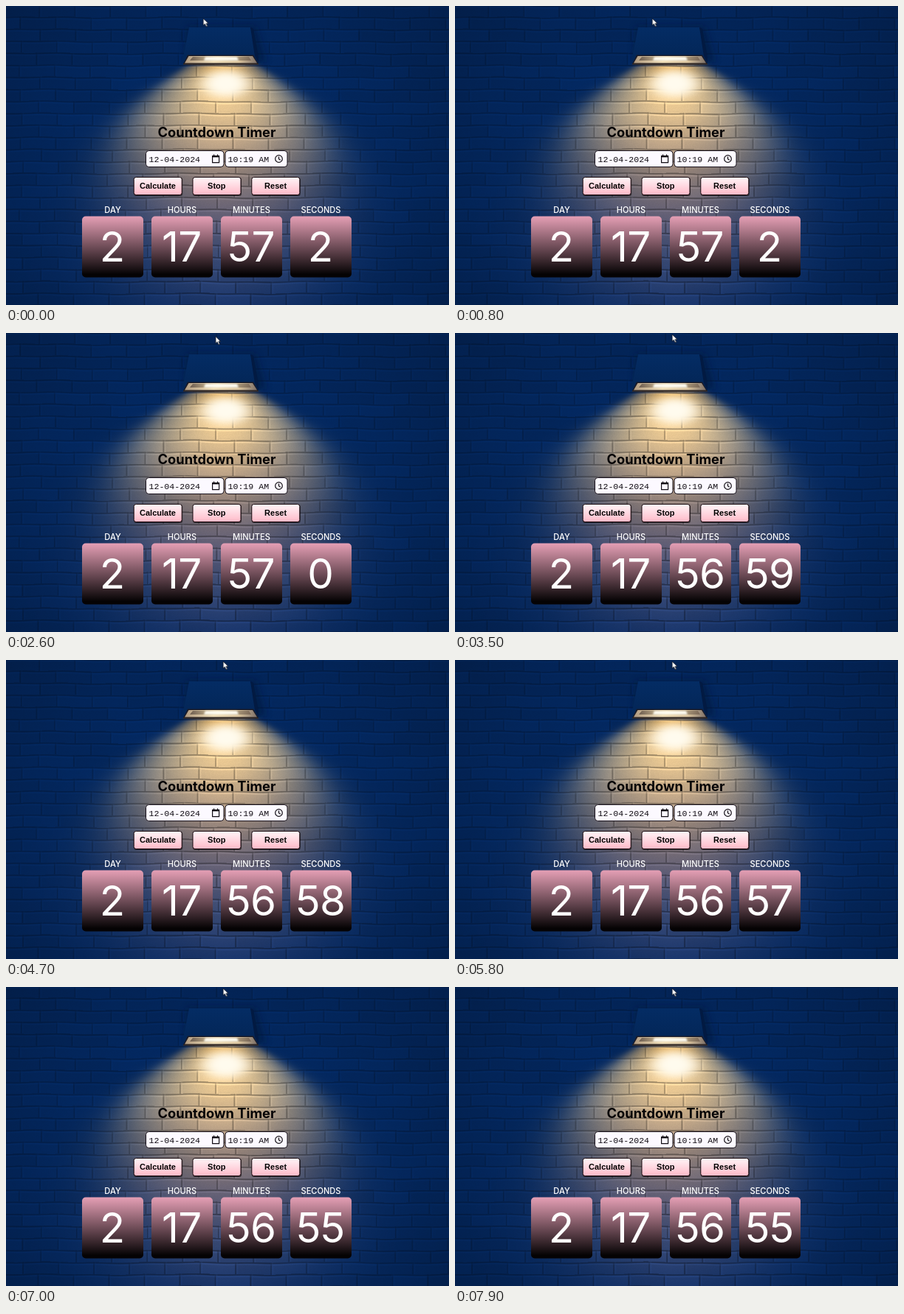
Animation of 600 by 406 pixels, one loop 8000 ms. Source, as an HTML page with a canvas:

```html
<!DOCTYPE html>
<html lang="en">
<head>
<meta charset="utf-8">
<title>Countdown Timer</title>
<style>
  html, body { margin: 0; width: 100%; height: 100%; overflow: hidden; background: #03265e; }
  canvas, svg { position: absolute; left: 0; top: 0; width: 600px; height: 406px; display: block; }
  text { text-anchor: middle; }
  .title { font: 700 18.3px Inter, "Open Sans", sans-serif; fill: #050305; }
  .field { fill: #fcf9ff; stroke: #17101a; }
  .value { font: 11.6px "Liberation Mono", "Courier New", monospace; fill: #120d14; text-anchor: start; }
  .button { fill: url(#pink); stroke: #16090e; }
  .caption { font: bold 11px "Liberation Sans", Arial, sans-serif; fill: #000; }
  .label { font: 500 11.1px Inter, "Open Sans", sans-serif; fill: #fff; }
  .digits { font: 56.5px Inter, "Open Sans", sans-serif; fill: #fff; letter-spacing: -.8px; }
  .cursor { animation: wander 8s linear infinite; }
  @keyframes wander {
    0%, 13% { transform: translate(267.3px, 17px); }
    17.5% { transform: translate(263px, 17.3px); }
    21%, 28.5% { transform: translate(256.3px, 12px); }
    34%, 100% { transform: translate(294.2px, 2px); }
  }
</style>
</head>
<body>
<canvas id="wall" width="600" height="406"></canvas>
<svg viewBox="0 0 600 406">
  <defs>
    <linearGradient id="pink" x2="0" y2="1">
      <stop offset="0" stop-color="#fff6f8"/><stop offset="1" stop-color="#ffb9c8"/>
    </linearGradient>
    <linearGradient id="card" x2="0" y2="1">
      <stop offset="0" stop-color="#e59fb5"/><stop offset=".95" stop-color="#050304"/>
    </linearGradient>
    <linearGradient id="shade" x2="0" y2="1">
      <stop offset="0" stop-color="#042c64"/><stop offset="1" stop-color="#032555"/>
    </linearGradient>
    <linearGradient id="lip">
      <stop offset="0" stop-color="#b09a80"/><stop offset=".4" stop-color="#efdcb4"/>
      <stop offset=".75" stop-color="#d9c29b"/><stop offset="1" stop-color="#7d7068"/>
    </linearGradient>
    <linearGradient id="inside">
      <stop offset="0" stop-color="#6d5d50"/><stop offset=".45" stop-color="#e8d3a6"/>
      <stop offset="1" stop-color="#7a6857"/>
    </linearGradient>
    <filter id="soft" x="-30%" y="-30%" width="160%" height="160%"><feGaussianBlur stdDeviation="5"/></filter>
    <filter id="glow" x="-30%" y="-80%" width="160%" height="260%"><feGaussianBlur stdDeviation="1"/></filter>
  </defs>

  <g id="lamp">
    <path d="M246 28H338L352 76H242Z" fill="#011638" opacity=".55" filter="url(#soft)"/>
    <path d="M248 29H331L341 68V78H240V70Z" fill="url(#shade)"/>
    <path d="M331 29L335 31L342 70V78L337 68Z" fill="#021a42"/>
    <path d="M246 66.500H335L342 79H240Z" fill="#1a1a26"/>
    <path d="M247.500 68H334L340 77.500H242Z" fill="url(#lip)"/>
    <path d="M253 69H329L332 74H249Z" fill="url(#inside)"/>
    <path d="M270 69.300H313L315 74H268Z" fill="#fffdf2" filter="url(#glow)"/>
    <path d="M240 78.800H342" stroke="#3a2a1c" stroke-width="1.200"/>
  </g>

  <text class="title" x="285.500" y="177.800">Countdown Timer</text>

  <rect class="field" x="189.500" y="196.500" width="105.500" height="22" rx="4"/>
  <rect class="field" x="297" y="196.500" width="84" height="22" rx="4"/>
  <text class="value" x="193.500" y="211.700">12-04-2024</text>
  <text class="value" x="300.500" y="211.700">10:19 AM</text>
  <g fill="none" stroke="#120d14" stroke-width="1.200">
    <path d="M279.600 203.500H288.600V212.600H279.600Z"/>
    <path d="M279.600 204.300H288.600" stroke-width="2.200"/>
    <path d="M281.600 201.500V204M286.600 201.500V204"/>
    <circle cx="369.500" cy="207.500" r="4.800"/>
    <path d="M369.500 204.500V207.800L371.700 209.300"/>
  </g>

  <g id="buttons"></g>
  <g id="cards"></g>

  <g class="cursor">
    <path d="M0 0V9.200L2.200 7.300L3.900 11L5.500 10.300L3.900 6.700H6.700Z" fill="#fff" stroke="#10131c" stroke-width=".7"/>
  </g>
</svg>
<script>
const $ = id => document.getElementById(id);

$('buttons').innerHTML = ['Calculate', 'Stop', 'Reset'].map((name, i) => {
  const x = 173.2 + i * 79.8;
  return `<rect x="${x}" y="233" width="66" height="25" rx="3" fill="#0a0508" opacity=".6"/>
    <rect class="button" x="${x}" y="232.500" width="65" height="24" rx="3"/>
    <text class="caption" x="${x + 32.3}" y="248">${name}</text>`;
}).join('');

$('cards').innerHTML = ['DAY', 'HOURS', 'MINUTES', 'SECONDS'].map((name, i) => {
  const x = 103 + i * 94;
  return `<text class="label" x="${x + 41.5}" y="281">${name}</text>
    <rect x="${x}" y="285.500" width="83" height="83" rx="5" fill="url(#card)"/>
    <text class="digits" x="${x + 40.7}" y="346.700"></text>`;
}).join('');

// Brick wall lit from the lamp, shaded per pixel
function paintWall() {
  const W = 600, H = 406, ROW = 16.3, BRICK = 48;
  const ctx = $('wall').getContext('2d');
  const img = ctx.createImageData(W, H);
  const stops = [
    [78, 232, 180, 98], [105, 252, 214, 150], [140, 238, 204, 150],
    [170, 206, 177, 139], [200, 172, 149, 126], [240, 132, 118, 117],
    [290, 95, 93, 118], [340, 58, 74, 115], [406, 26, 53, 106]
  ];
  const hash = (a, b) => {
    const v = Math.sin(a * 127.1 + b * 311.7) * 43758.5453;
    return v - Math.floor(v);
  };
  const bell = v => Math.exp(-v * v);
  const clamp = v => Math.max(0, Math.min(1, v));

  function axisColor(y) {
    let i = 0;
    while (i < stops.length - 2 && y > stops[i + 1][0]) i++;
    const a = stops[i], b = stops[i + 1], f = clamp((y - a[0]) / (b[0] - a[0]));
    return [1, 2, 3].map(c => a[c] + (b[c] - a[c]) * f);
  }

  for (let y = 0; y < H; y++) {
    const warm = axisColor(y);
    const drop = Math.max(0, y - 80);
    const half = 48 + 128 * Math.tanh(drop / 88);
    const blur = 4 + drop * 0.13;
    for (let x = 0; x < W; x++) {
      const dx = Math.abs(x - 293);
      const cone = clamp((y - 76) / 7) / (1 + Math.exp((dx - half) / blur));
      const lit = cone * bell(dx / half);
      const hot = bell(Math.hypot((x - 297) / 32, (y - 105) / 19) ** 1.7);

      const wy = y + 0.6 * Math.sin(x / 31) + 0.4 * Math.sin(x / 11 + y / 40);
      const row = Math.floor((wy + 2) / ROW);
      const dy = wy + 2 - row * ROW;
      const shift = 283 + (row % 2 ? BRICK / 2 : 0) + (hash(row, 3) - 0.5) * 7;
      const col = Math.floor((x - shift) / BRICK);
      const bx = x - shift - col * BRICK;

      const groove = Math.max(bell((dy - 1) / 1.1), 0.85 * bell((bx - 1) / 1.1));
      const edge = Math.max(bell((dy - 3.2) / 1), 0.6 * bell((bx - 3) / 1));
      const tone = 1 + (hash(row, col) - 0.5) * 0.08 + (hash(x, y) - 0.5) * 0.03;
      const relief = tone * (1 - groove * (0.2 + 0.14 * lit) * (1 - hot)
        + edge * (0.1 + 0.06 * lit) * (1 - hot));

      const far = Math.hypot((x - 300) / 300, (y - 220) / 260);
      const dim = 1.04 - 0.14 * far * far;
      const blue = [3, 39 * dim, 94 * dim];
      const p = (y * W + x) * 4;
      [255, 251, 238].forEach((white, c) => {
        const base = (blue[c] + (warm[c] - blue[c]) * lit) * relief;
        img.data[p + c] = base + (white - base) * hot;
      });
      img.data[p + 3] = 255;
    }
  }
  ctx.putImageData(img, 0, 0);
}
paintWall();

const digits = document.querySelectorAll('.digits');
const START = ((2 * 24 + 17) * 60 + 57) * 60 + 2;
const LOOP = 8000, LEAD = 20;

function tick() {
  const t = performance.now() % LOOP;
  const left = START - Math.min(7, Math.floor((t + LEAD) / 1000));
  const parts = [
    Math.floor(left / 86400), Math.floor(left / 3600) % 24,
    Math.floor(left / 60) % 60, left % 60
  ];
  parts.forEach((value, i) => {
    if (digits[i].textContent !== String(value)) digits[i].textContent = value;
  });
  requestAnimationFrame(tick);
}
tick();
</script>
</body>
</html>
```
